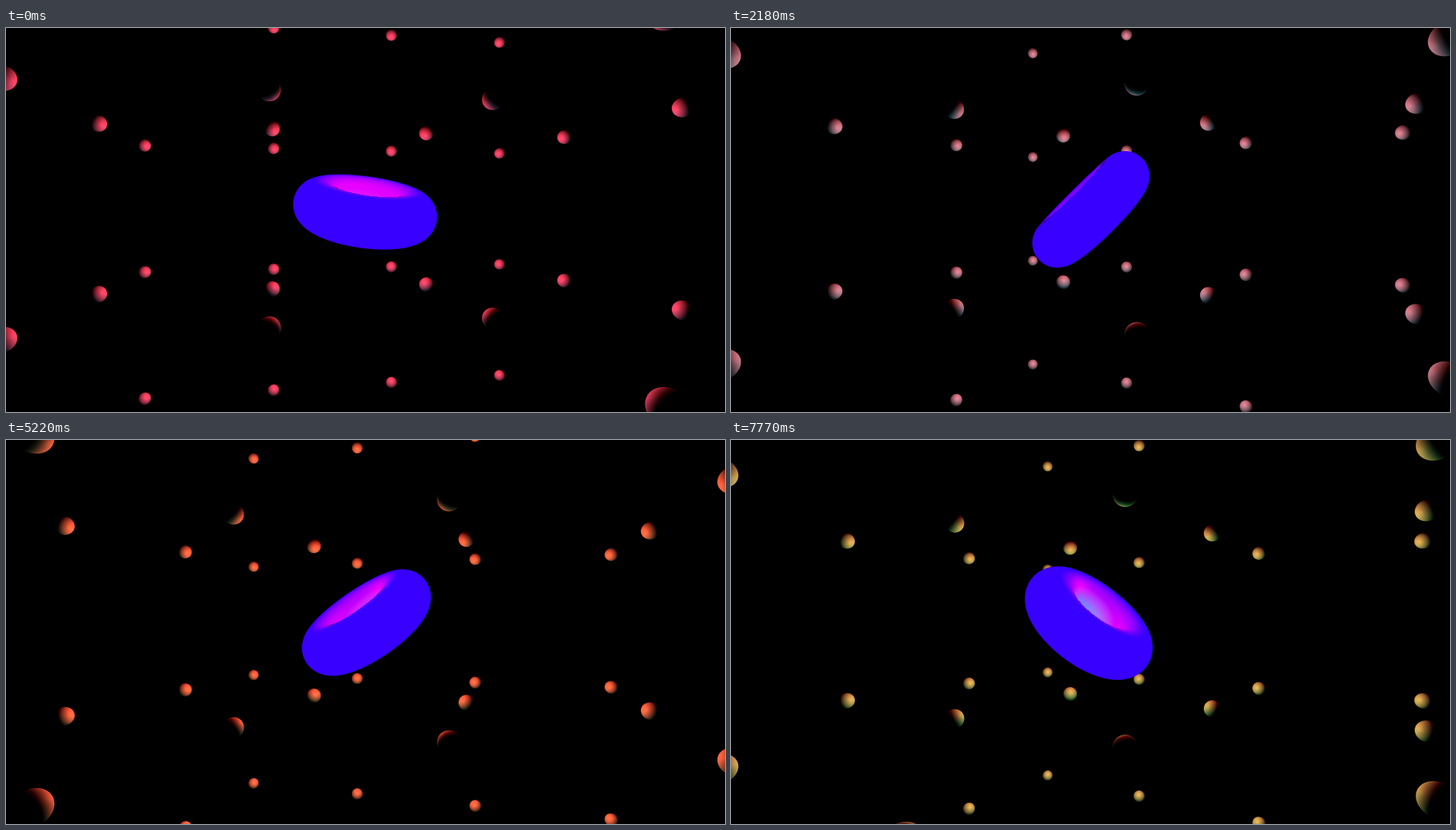
Animation of 923x493 px, one loop 7.87 s. Source, as an HTML page with a canvas:

```html
<!DOCTYPE html>
<html lang="en">
<head>
<meta charset="utf-8">
<title>Torus in a lattice of spheres</title>
<style>
  html, body { margin: 0; width: 100%; height: 100%; overflow: hidden; background: #000; }
  canvas { display: block; }
</style>
</head>
<body>
<canvas id="stage" width="923" height="493"></canvas>
<script>
const W = 923, H = 493, LOOP = 7870;
const CX = 461.3, CY = 232.2, FOCAL = 620, CAM = 2.6;   // lengths in lattice steps
const BALL = 0.049, RING = 0.2565, TUBE = 0.1265, LAMP_Y = 0.2;
const RED = [176, 0, 0], GLOW = [56, 0, 255], DARK = [0, 0, 0];

const ctx = document.getElementById('stage').getContext('2d');
const image = ctx.createImageData(W, H);
const pixels = image.data;

// Values at the key times: lattice angle, torus axis heading and tilt, lower lamp colour
const TIMES = [0, 700, 2180, 3970, 5220, 6220, 7770, LOOP];
const SPIN = [10.2, 55.2, 150.1, 263, 344.05, 407.2, 506.2, 512.6];
const HEADING = [29, 95, 277, 496, 654, 664.5, 777, 785];
const TILT = [16, 45, 45, 36.5, 37, 38.4, 42.5, 43];
const LAMP = [
  [92, 70, 42, 165, 105, 92, 50, 50],
  [72, 88, 130, 27, 110, 75, 175, 175],
  [108, 55, 145, 88, 68, 82, 85, 85]
];

const rad = deg => deg * Math.PI / 180;
const clamp = v => Math.max(0, Math.min(1, v));
const dot = (a, b) => a[0] * b[0] + a[1] * b[1] + a[2] * b[2];
const mix = (a, b, k) => [a[0] + b[0] * k, a[1] + b[1] * k, a[2] + b[2] * k];
const unit = a => mix(DARK, a, 1 / Math.hypot(...a));

function track(values, t) {
  let i = 0;
  while (i < TIMES.length - 2 && t >= TIMES[i + 1]) i++;
  const k = (t - TIMES[i]) / (TIMES[i + 1] - TIMES[i]);
  return values[i] + (values[i + 1] - values[i]) * k;
}

function shade(point, normal, base, shine, lamps) {
  let colour = base;
  const eye = unit(mix([0, 0, CAM], point, -1));
  for (const lamp of lamps) {
    const toLamp = unit(mix(lamp.at, point, -1));
    const facing = dot(normal, toLamp);
    if (facing <= 0) continue;
    const half = unit(mix(toLamp, eye, 1));
    const gloss = shine * Math.max(0, dot(normal, half)) ** 30;
    colour = mix(colour, lamp.colour, facing + gloss);
  }
  return colour;
}

// Calls trace(direction) for each pixel of a box; it returns [coverage, colour] or nothing
function paint(x, y, size, trace) {
  const x1 = Math.min(W, Math.ceil(x + size)), y1 = Math.min(H, Math.ceil(y + size));
  for (let py = Math.max(0, Math.floor(y - size)); py < y1; py++) {
    for (let px = Math.max(0, Math.floor(x - size)); px < x1; px++) {
      const hit = trace(unit([(px + 0.5 - CX) / FOCAL, (CY - py - 0.5) / FOCAL, -1]));
      if (!hit) continue;
      const o = (py * W + px) * 4;
      for (let c = 0; c < 3; c++) {
        pixels[o + c] += (Math.min(255, hit[1][c]) - pixels[o + c]) * hit[0];
      }
    }
  }
}

function drawBall(centre, lamps) {
  const depth = CAM - centre[2], scale = FOCAL / depth;
  const toCentre = mix(centre, [0, 0, CAM], -1);
  const x = CX + centre[0] * scale, y = CY - centre[1] * scale;
  paint(x, y, BALL * scale * 1.5 + 2, dir => {
    const along = dot(toCentre, dir);
    const miss = Math.sqrt(Math.max(0, dot(toCentre, toCentre) - along * along));
    const cover = clamp((BALL - miss) * scale + 0.5);
    if (!cover) return;
    const reach = along - Math.sqrt(Math.max(0, BALL * BALL - miss * miss));
    const point = mix([0, 0, CAM], dir, reach);
    return [cover, shade(point, unit(mix(point, centre, -1)), DARK, 0.09, lamps)];
  });
}

function drawTorus(axis, lamps) {
  const scale = FOCAL / CAM;
  paint(CX, CY, 104, dir => {
    let reach = CAM - 0.45, nearest = 1, best = reach;
    for (let i = 0; i < 48 && reach < CAM + 0.45; i++) {
      const p = mix([0, 0, CAM], dir, reach);
      const lift = dot(p, axis);
      const out = Math.sqrt(Math.max(0, dot(p, p) - lift * lift)) - RING;
      const gap = Math.sqrt(out * out + lift * lift) - TUBE;
      if (gap < nearest) { nearest = gap; best = reach; }
      if (gap < 0.0004) break;
      reach += gap;
    }
    const cover = clamp(1.1 - nearest * scale);
    if (!cover) return;
    const point = mix([0, 0, CAM], dir, best);
    const spoke = unit(mix(point, axis, -dot(point, axis)));
    const normal = unit(mix(point, spoke, -RING));
    return [cover, shade(point, normal, GLOW, 0, lamps)];
  });
}

function lattice(angle) {
  const c = Math.cos(angle), s = Math.sin(angle), steps = [-1.5, -0.5, 0.5, 1.5];
  const balls = [];
  for (const x of steps) for (const y of steps) for (const z of steps) {
    balls.push([x * c + z * s, y, z * c - x * s]);
  }
  return balls.filter(b => CAM - b[2] > 0.2).sort((a, b) => a[2] - b[2]);
}

function draw(t) {
  for (let i = 0; i < pixels.length; i += 4) {
    pixels[i] = pixels[i + 1] = pixels[i + 2] = 0;
    pixels[i + 3] = 255;
  }
  const lamps = [
    { at: [0, LAMP_Y, 0], colour: RED },
    { at: [0, -LAMP_Y, 0], colour: LAMP.map(channel => track(channel, t)) }
  ];
  for (const ball of lattice(rad(track(SPIN, t)))) drawBall(ball, lamps);

  const heading = rad(track(HEADING, t)), tilt = rad(track(TILT, t));
  const lean = Math.sin(tilt);
  drawTorus([lean * Math.sin(heading), Math.cos(tilt), lean * Math.cos(heading)], lamps);
  ctx.putImageData(image, 0, 0);
}

const start = performance.now();
function frame() {
  draw((performance.now() - start) % LOOP);
  requestAnimationFrame(frame);
}
frame();
</script>
</body>
</html>
```
